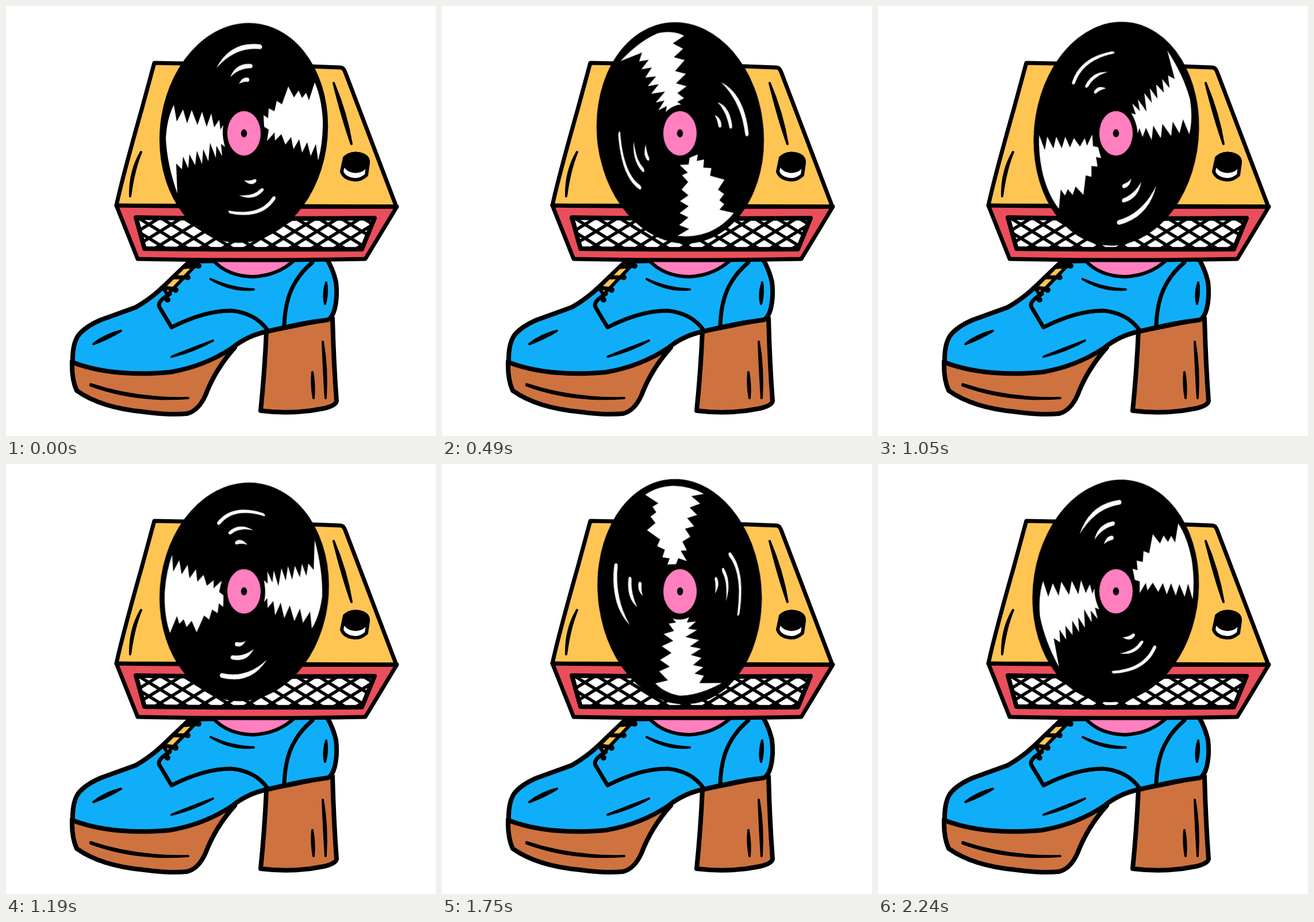
Animation of 748x748 px, one loop 2.31 s. Source, as an HTML page without scripts:

```html
<!DOCTYPE html>
<html lang="en">
<head>
<meta charset="utf-8">
<title>Record player shoe</title>
<style>
  html, body { margin: 0; width: 100%; height: 100%; overflow: hidden; background: #fff; }
  svg { display: block; width: 100vw; height: 100vh; }
  .ink { stroke: #000; stroke-width: 8; stroke-linejoin: round; stroke-linecap: round; }
  .line { fill: none; stroke-width: 7; }
  .mark { fill: #000; stroke-width: 4; }
  .blue { fill: #10aef9; }
  .brown { fill: #ce7340; }
  .yellow { fill: #ffc553; }
  .red { fill: #e94e5b; }
  .pink { fill: #ff7fbf; }
  .white { fill: #fff; }
  .spin { animation: spin 2.31s steps(33) infinite; }
  @keyframes spin { to { transform: rotate(360deg); } }
</style>
</head>
<body>
<svg viewBox="0 0 748 748">
  <defs>
    <pattern id="mesh" width="39" height="24" x="229" y="368" patternUnits="userSpaceOnUse">
      <rect width="39" height="24" fill="#fff"/>
      <path d="M-13-8 52 32M-13 32 52-8" stroke="#000" stroke-width="5.5"/>
    </pattern>
  </defs>

  <!-- shoe -->
  <g class="ink">
    <path class="brown" d="M115 618Q114 650 123 669Q165 699 240 706Q285 712 315 709Q335 704 347 677Q364 632 398 594L250 600Z"/>
    <path class="brown" d="M453 566L568 543Q570 620 575 687Q574 695 553 700Q500 711 443 704Q450 635 453 566Z"/>
    <path class="blue" d="M116 620Q115 590 125 574Q137 558 165 546L226 524Q252 509 274 488L320 444L558 440Q569 458 574 480Q577 505 572 526Q568 542 560 546Q510 552 455 566Q420 573 393 595Q345 627 285 637Q185 646 116 620Z"/>
    <path class="pink" d="M360 442Q385 470 430 471Q473 469 503 441Z" stroke-width="6"/>
    <path class="yellow" d="M273 490L317 446L331 450L281 502Z" style="stroke-width:6"/>
    <path class="line" d="M285 501Q262 514 267 524L288 559Q345 530 392 530Q434 534 455 564M484 555Q486 508 503 481Q513 463 533 446"/>
    <path class="line" d="M275 490L296 493M291 472L316 472M311 454L334 452"/>
    <g class="mark">
      <circle cx="281" cy="511" r="3"/>
      <circle cx="295" cy="494" r="3"/>
      <circle cx="316" cy="472" r="3"/>
      <circle cx="335" cy="452" r="3"/>
      <path d="M356 475Q393 492 431 493Q393 497 356 475Z"/>
      <path d="M152 588Q172 572 200 565Q177 579 152 588Z"/>
      <path d="M288 610Q325 595 360 582Q328 600 288 610Z"/>
      <path d="M557 481Q551 502 555 518Q560 500 557 481Z"/>
      <path d="M147 658Q225 684 317 682Q225 689 147 660Z"/>
      <path d="M551 584Q553 635 556 682Q559 630 551 584Z"/>
      <path d="M533 637Q531 660 535 682Q537 660 533 637Z"/>
    </g>
  </g>

  <!-- player -->
  <g class="ink" style="stroke-width:7">
    <path class="yellow" d="M258 99L310 100 530 105 582 107Q587 107 590 115L679 349 192 347Q202 300 236 180Z"/>
    <path class="red" d="M192 347Q430 350 680 349L625 440Q430 444 229 440Z"/>
    <path d="M226 368Q430 371 641 369L619 423Q430 424 241 422Z" fill="url(#mesh)" style="stroke-width:8"/>
    <g class="mark">
      <path d="M570 134Q592 186 601 240Q586 198 570 134Z"/>
      <path d="M235 254Q215 288 216 331Q222 285 235 254Z"/>
    </g>
    <path class="white" d="M589 264Q599 255 613 257Q631 260 630 273L627 294Q616 304 605 302Q588 300 584 288Z" style="stroke-width:6"/>
    <ellipse cx="608" cy="272" rx="19" ry="15"/>
  </g>

  <!-- record -->
  <g transform="translate(414 221.5) scale(.75 1)">
    <g class="spin">
      <ellipse cy="-1" rx="199.5" ry="187" transform="rotate(-35)"/>
      <g class="white" transform="scale(1.3333 1) translate(-414 -221.5)">
        <path d="M448 190L456 195 457 178 467 183 471 165 480 171 491 140 501 159 509 147 515 160 522 151 527 164 537 133Q549 160 551 198Q552 235 543 269L539 240 530 261 524 237 515 255 510 232 500 249 496 228 486 241 479 223 468 234 467 220 454 235 457 215 449 210Z"/>
        <path d="M292 172L297 201 308 180 315 204 323 181 333 207 341 184 349 210 357 187 362 211 371 198 373 215 378 207Q375 225 381 245L374 240 376 261 366 243 365 264 355 238 352 270 343 249 341 275 332 252 329 277 319 258 317 282 308 262 306 284 296 274 298 326Q280 275 278 230Q280 195 292 172Z"/>
        <path d="M366 108Q391 60 443 67Q448 71 443 75Q399 70 366 108Z"/>
        <path d="M390 124Q400 98 427 101Q431 104 427 108Q405 108 390 124Z"/>
        <path d="M405 136Q411 122 422 125Q425 129 421 132Q412 131 405 136Z"/>
        <path d="M388 356Q442 366 464 332Q469 329 469 335Q446 372 390 361Q385 358 388 356Z"/>
        <path d="M405 329Q430 332 443 318Q449 315 448 321Q431 341 405 329Z"/>
        <path d="M414 303Q425 305 433 301Q438 302 434 307Q425 314 414 303Z"/>
      </g>
      <circle r="48"/>
      <circle class="pink" r="38.7"/>
      <circle r="7"/>
    </g>
  </g>
</svg>
</body>
</html>
```
